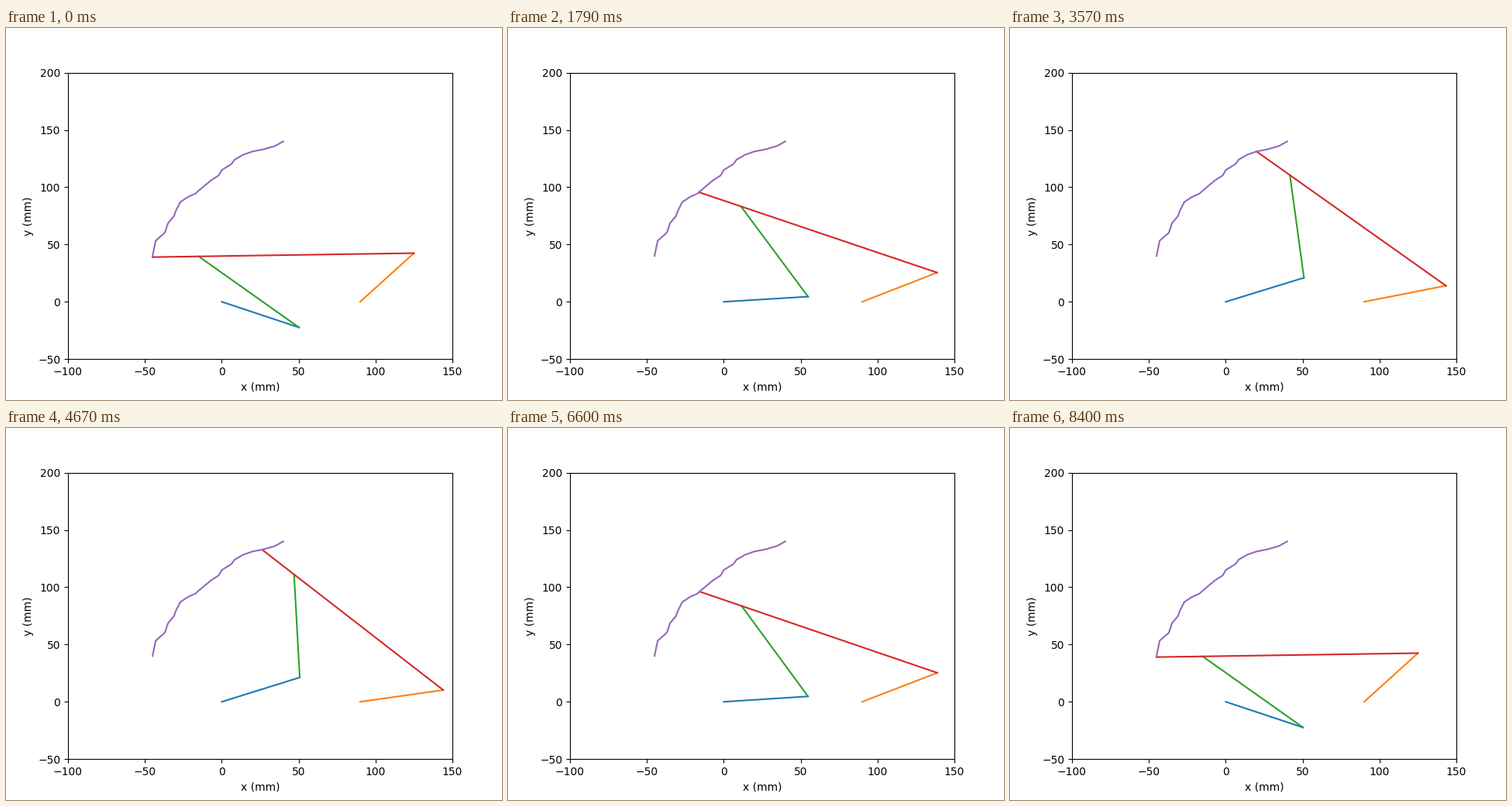
A matplotlib script for the animation above (8.45 s loop, 640 by 480 pixels).

```python
import matplotlib.pyplot as plt
import numpy as np
from matplotlib.animation import FuncAnimation

# Linkage dimensions (mm)
CRANK, COUPLER, ARM, TAIL = 55, 90, 170, 30
LEFT, RIGHT = np.array([0.0, 0.0]), np.array([90.0, 0.0])

# Timing (ms): a rest on every waypoint, then eight short steps to the next
TICK, REST, STEP, STEPS = 10, 50, 20, 9
LEG = REST + STEP * (STEPS - 1)

path = np.array([
    (-45, 40), (-43, 53.3), (-37, 60.3), (-35, 68.5), (-31, 75), (-30, 79),
    (-27, 87), (-22, 91.5), (-17, 94.5), (-15, 97), (-11, 101.5), (-7, 106),
    (-2, 110.3), (0, 115), (6.3, 120.2), (8.3, 124), (14, 128.4), (20, 131.2),
    (27, 133), (34.7, 136), (40, 140),
])
reached = path.copy()
reached[0, 1] = 39  # the arm stops just short of the first point
LAST = len(path) - 1
LOOP = 2 * LAST * LEG + REST


def crank_end(pivot, target, reach):
    """End of the crank at pivot whose link of length reach hits target."""
    dx, dy = target - pivot
    dist = np.hypot(dx, dy)
    bend = np.arccos((CRANK**2 + dist**2 - reach**2) / (2 * CRANK * dist))
    angle = np.arctan2(dy, dx) - bend
    return pivot + CRANK * np.array([np.cos(angle), np.sin(angle)])


def tip_at(t):
    leg, rest = divmod(t, LEG)
    step = 0 if rest < REST else 1 + (rest - REST) // STEP
    pos = leg + step / STEPS
    pos = LAST - abs(LAST - pos)
    return np.array([np.interp(pos, range(LAST + 1), c) for c in reached.T])


fig, ax = plt.subplots(figsize=(6.4, 4.8), dpi=100)
ax.set(xlim=(-100, 150), ylim=(-50, 200), xlabel="x (mm)", ylabel="y (mm)")

# Render the static axes once and reuse them as a backdrop
fig.canvas.draw()
backdrop = np.array(fig.canvas.buffer_rgba())
ax.set_axis_off()
fig.figimage(backdrop, zorder=-1)

left, right, coupler, arm = [ax.plot([], [], f"C{i}")[0] for i in range(4)]
ax.plot(*path.T, "C4")


def update(k):
    tip = tip_at(k * TICK)
    b = crank_end(RIGHT, tip, ARM)
    joint = tip + (b - tip) * TAIL / ARM
    a = crank_end(LEFT, joint, COUPLER)
    ends = (LEFT, a), (RIGHT, b), (a, joint), (b, tip)
    links = left, right, coupler, arm
    for link, pair in zip(links, ends):
        link.set_data(*np.transpose(pair))
    return links


anim = FuncAnimation(fig, update, frames=LOOP // TICK, interval=TICK,
                     repeat=True, repeat_delay=0, cache_frame_data=False)
plt.show()
```
